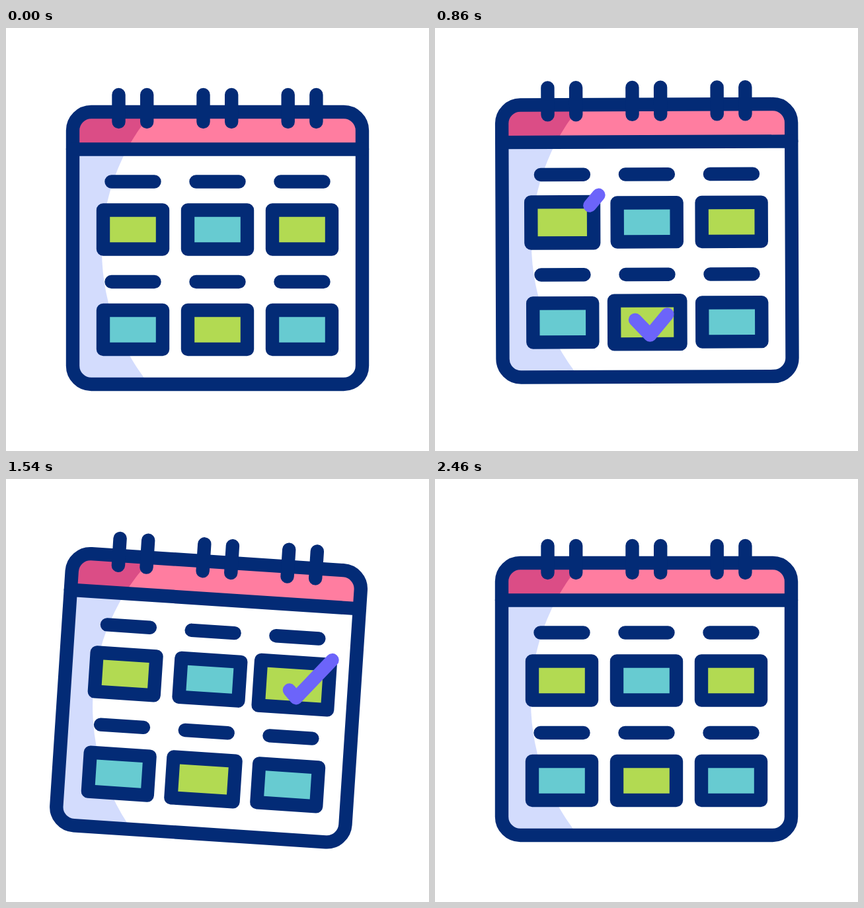
Write an HTML page that moves like this. It is 640 by 640 pixels and loops after 2800 ms.

```html
<!DOCTYPE html>
<html lang="en">
<head>
<meta charset="utf-8">
<title>Calendar</title>
<style>
  html, body { margin: 0; width: 100%; height: 100%; overflow: hidden; background: #fff; }
  svg { display: block; width: 100%; height: 100%; }
  .ink { fill: none; stroke: #032b76; stroke-width: 20.4; stroke-linecap: round; stroke-linejoin: round; }
  .tick { fill: none; stroke: #6c64fa; stroke-width: 20; stroke-linecap: round; stroke-linejoin: round; }
</style>
</head>
<body>
<svg viewBox="0 0 640 640">
  <defs>
    <clipPath id="page"><rect x="101" y="127" width="438" height="412" rx="28"/></clipPath>
    <clipPath id="disc"><circle cx="469" cy="336" r="324"/></clipPath>
  </defs>
  <g id="calendar">
    <g clip-path="url(#page)">
      <path fill="#d3dcfd" d="M101 183H539V539H101z"/>
      <path fill="#db4d86" d="M101 127H539V183H101z"/>
      <g clip-path="url(#disc)">
        <path fill="#fff" d="M101 183H539V539H101z"/>
        <path fill="#ff7da0" d="M101 127H539V183H101z"/>
      </g>
    </g>
    <rect class="ink" x="101" y="127" width="438" height="412" rx="28"/>
    <path class="ink" id="lines"/>
  </g>
</svg>
<script>
const LOOP = 2800;
const GREEN = '#b2da52', TEAL = '#67cbd1';
const COLS = [192, 320, 448], ROWS = [305, 456.5];
const CELL = { w: 90, h: 59 };
const DELAY = 400;

// Key tables: [time in ms, value], eased between neighbours.
const SWING = [[305, 0], [615, 8], [1098, -8], [1492, 4], [1895, -2], [2450, 0]];
const BOB = [[130, 0], [515, 11.6], [930, -13], [1335, 8.5], [1735, -10.3], [2150, 0]];
const POP = [[130, 1], [690, 1.18], [980, 0.98], [1240, 1.08], [1460, 1]];
const DRAW = [[300, 0], [566, 1]];
const ERASE = [[680, 0], [930, 1]];

// Tick corners relative to the middle of its cell.
const TICK = [[-18.5, -4], [4, 19.5], [55, -41.5]];
const SHORT = Math.hypot(22.5, 23.5);
const LENGTH = SHORT + Math.hypot(51, 61);

const calendar = document.getElementById('calendar');

function add(name, attrs) {
  const el = document.createElementNS('http://www.w3.org/2000/svg', name);
  for (const key in attrs) el.setAttribute(key, attrs[key]);
  return calendar.appendChild(el);
}

function sample(keys, t) {
  if (t <= keys[0][0]) return keys[0][1];
  for (let i = 1; i < keys.length; i++) {
    const [t0, a] = keys[i - 1], [t1, b] = keys[i];
    if (t < t1) {
      const u = (t - t0) / (t1 - t0);
      return a + (b - a) * u * u * (3 - 2 * u);
    }
  }
  return keys[keys.length - 1][1];
}

const bars = ROWS.flatMap(y => COLS.map(x => `M${x - 32.5} ${y - 72.5}h65`));
const rings = [170.5, 298.5, 426.7].flatMap(x => [x, x + 42.7]).map(x => `M${x} 101V142`);
document.getElementById('lines').setAttribute('d', ['M101 183.5H539', ...rings, ...bars].join(''));

const cells = ROWS.flatMap((y, row) => COLS.map((x, col) => {
  const green = (row + col) % 2 === 0;
  const el = add('rect', { class: 'ink', style: `fill:${green ? GREEN : TEAL}` });
  return { el, x, y };
}));

function resize({ el, x, y }, scale) {
  const w = CELL.w * scale, h = CELL.h * scale;
  const box = { x: x - w / 2, y: y - h / 2, width: w, height: h };
  for (const key in box) el.setAttribute(key, box[key]);
}
cells.forEach(cell => resize(cell, 1));

const checked = [cells[0], cells[4], cells[2]].map((cell, i) => ({
  cell, delay: i * DELAY, tick: add('path', { class: 'tick' })
}));

function along(distance) {
  const first = distance < SHORT;
  const [a, b] = first ? [TICK[0], TICK[1]] : [TICK[1], TICK[2]];
  const u = first ? distance / SHORT : (distance - SHORT) / (LENGTH - SHORT);
  return [a[0] + (b[0] - a[0]) * u, a[1] + (b[1] - a[1]) * u];
}

function tickPath({ x, y }, from, to) {
  if (to - from < 0.001) return '';
  const start = from * LENGTH, end = to * LENGTH;
  const points = [along(start), along(end)];
  if (start < SHORT && end > SHORT) points.splice(1, 0, TICK[1]);
  return 'M' + points.map(p => `${x + p[0]} ${y + p[1]}`).join('L');
}

function render(t) {
  calendar.setAttribute('transform',
    `translate(0 ${sample(BOB, t)}) rotate(${sample(SWING, t)} 320 128)`);
  for (const { cell, delay, tick } of checked) {
    const local = t - delay;
    resize(cell, sample(POP, local));
    tick.setAttribute('d', tickPath(cell, sample(ERASE, local), sample(DRAW, local)));
  }
}

const begin = performance.now();
function frame() {
  render((performance.now() - begin) % LOOP);
  requestAnimationFrame(frame);
}
render(0);
requestAnimationFrame(frame);
</script>
</body>
</html>
```
